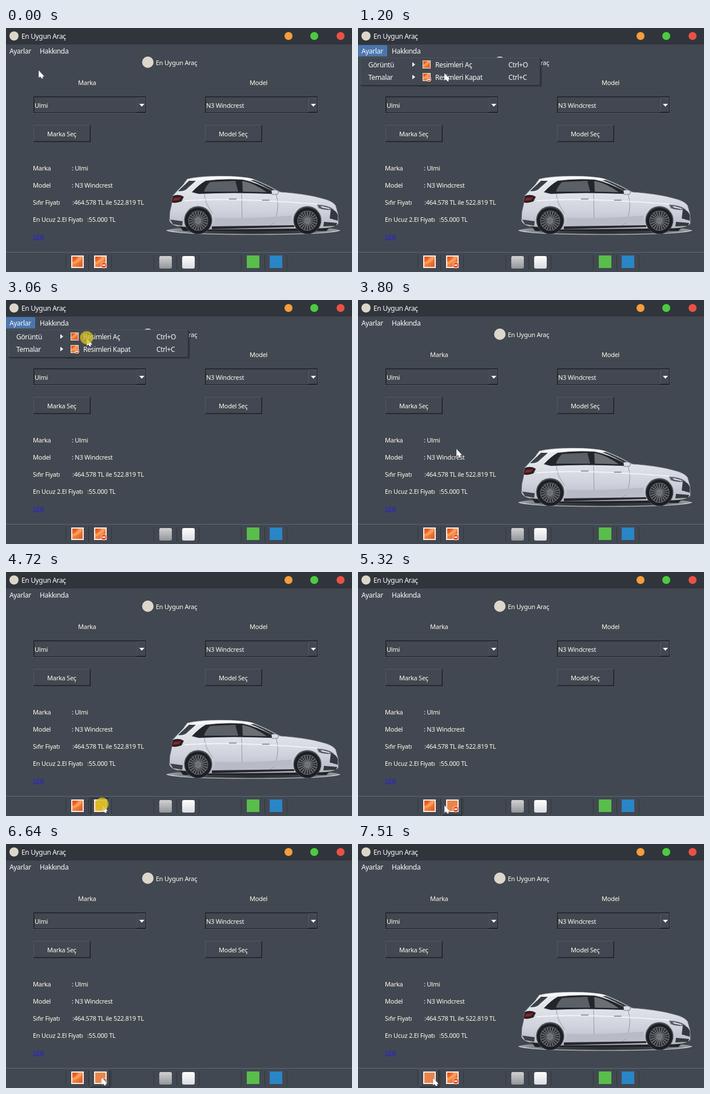
Recreate the animation shown at these times as an HTML page with a canvas. Size 605x428 px, loop 8.64 s.

```html
<!DOCTYPE html>
<html lang="tr">
<head>
<meta charset="utf-8">
<title>En Uygun Araç</title>
<style>
html, body { margin: 0; width: 100%; height: 100%; overflow: hidden; background: #424851; }
canvas { display: block; }
</style>
</head>
<body>
<canvas id="stage" width="605" height="428"></canvas>
<script>
const ctx = document.getElementById('stage').getContext('2d');
const LOOP = 8640, STEP = 66.6;
const BG = '#424851', DARK = '#1c1f24', LIGHT = '#525861', CREAM = '#fffdec', WHITE = '#fafafa';
const BRAND = 'Ulmi', MODEL = 'N3 Windcrest';

// pointer path: time, x, y
const PATH = [
  [67, 57, 74], [270, 25, 40], [470, 25, 40], [790, 26, 61],
  [940, 26, 61], [1200, 152, 79], [1335, 156, 83],
  [1740, 156, 83], [2065, 25, 40], [2330, 25, 40], [2660, 26, 61],
  [2740, 26, 61], [2990, 141, 67],
  [3400, 141, 67], [3660, 178, 190], [3930, 166, 330], [4120, 102, 405], [4255, 120, 411],
  [4330, 120, 411], [4650, 168, 408],
  [5130, 168, 408], [5560, 131, 410],
  [6260, 131, 410], [6500, 167, 409],
  [6910, 167, 409], [7260, 131, 410]
];
const CLICKS = [[270, 400], [1540, 1600], [2130, 2270], [3060, 3130], [4720, 4860], [5650, 5780], [6580, 6640], [7370, 7510]];
const MENU = [[270, 1600], [2130, 3130]];
const HIDDEN = [[1600, 3130], [4860, 5780], [6640, 7510]];

const within = (list, t) => list.find(([a, b]) => t >= a && t < b);
const clamp = v => Math.max(0, Math.min(1, v));

function pointer(t) {
  t = Math.floor((t + 12) / STEP) * STEP;
  let a = PATH[0];
  for (const b of PATH) {
    if (t < b[0]) {
      const f = clamp((t - a[0]) / (b[0] - a[0] || 1));
      return [Math.round(a[1] + (b[1] - a[1]) * f), Math.round(a[2] + (b[2] - a[2]) * f)];
    }
    a = b;
  }
  return [a[1], a[2]];
}

function rect(x, y, w, h, fill) {
  ctx.fillStyle = fill;
  ctx.fillRect(x, y, w, h);
}

function disc(x, y, r, fill) {
  ctx.fillStyle = fill;
  ctx.beginPath();
  ctx.arc(x, y, r, 0, 7);
  ctx.fill();
}

function shape(d, fill, stroke, width = 1) {
  const p = new Path2D(d);
  if (fill) { ctx.fillStyle = fill; ctx.fill(p); }
  if (stroke) { ctx.strokeStyle = stroke; ctx.lineWidth = width; ctx.stroke(p); }
}

function grad(x0, y0, x1, y1, ...colors) {
  const g = ctx.createLinearGradient(x0, y0, x1, y1);
  colors.forEach((c, i) => g.addColorStop(i / (colors.length - 1), c));
  return g;
}

function text(s, x, y, color = CREAM, size = 11) {
  ctx.font = size + 'px "Noto Sans", "Open Sans", sans-serif';
  ctx.letterSpacing = size > 11 ? '-0.35px' : '-0.25px';
  ctx.fillStyle = color;
  ctx.fillText(s, x, y);
}

// raised bevel; swap the colours for a sunken one
function bevel(x, y, w, h, top = LIGHT, bottom = DARK) {
  rect(x, y, w, 1, top);
  rect(x, y, 1, h, top);
  rect(x, y + h - 1, w, 1, bottom);
  rect(x + w - 1, y, 1, h, bottom);
}

function combo(x, label) {
  bevel(x, 120, 198, 30, DARK, LIGHT);
  bevel(x + 1, 121, 196, 28, '#33383f', DARK);
  bevel(x + 181, 122, 16, 26);
  shape(`M${x + 185} 133h9l-4.5 5z`, '#fff');
  text(label, x + 2, 140);
}

function button(x, label) {
  bevel(x, 170, 100, 30);
  bevel(x + 1, 171, 98, 28, BG, '#2f343b');
  text(label, x + 24, 190);
}

function picture(x, y, s, fill) {
  rect(x, y, s, s, '#fbeee4');
  const b = s > 16 ? 2 : 1, n = s - 2 * b;
  rect(x + b, y + b, n, n, fill || grad(x, y, x + s, y + s, '#e03c16', '#f5803a', '#e2481a'));
  if (!fill) shape(`M${x + b} ${y + b + n * 0.5}q${n * 0.4} ${-n * 0.05} ${n * 0.6} ${-n * 0.5}h${n * 0.4}q${-n * 0.1} ${n * 0.5} ${-n} ${n * 0.8}z`, 'rgba(255,178,110,.6)');
}

function minus(x, y, r) {
  disc(x, y, r, '#f3ddd0');
  disc(x, y, r - 1, '#e4521f');
  rect(x - r * 0.5, y - 1, r, 2, '#fff');
}

function tile(x, top, bottom) {
  ctx.fillStyle = grad(0, 400, 0, 421, top, bottom);
  ctx.beginPath();
  ctx.roundRect(x, 400, 22, 22, 3);
  ctx.fill();
}

function wheel(x, y) {
  disc(x, y, 23, '#1d1f23');
  disc(x, y, 17.5, '#6c6f74');
  disc(x, y, 16.5, '#2c2f34');
  ctx.strokeStyle = '#83868b';
  ctx.lineWidth = 1.2;
  ctx.beginPath();
  for (let i = 0; i < 20; i++) {
    const a = i * Math.PI / 10;
    ctx.moveTo(x, y);
    ctx.lineTo(x + 16.5 * Math.cos(a), y + 16.5 * Math.sin(a));
  }
  ctx.stroke();
  disc(x, y, 3.5, '#6c6f74');
}

function car() {
  // ground
  ctx.fillStyle = grad(281, 0, 584, 0, '#a4a7ab', '#3a3d43', '#2b2e33', '#3a3d43', '#a4a7ab');
  ctx.beginPath();
  ctx.ellipse(432, 355, 151, 7, 0, 0, 7);
  ctx.fill();
  shape('M281 355Q300 362 432 362T584 355', null, '#dcdee1', 1.2);
  shape('M300 344H572L560 356H310z', '#1f2226');
  // body
  shape('M286 338L287 322L290 309L291 295Q299 286 309 276L317 265Q336 260 374 260Q414 260 432 265Q455 274 480 288Q524 291 552 299Q570 303 576 311L580 325L581 343Q575 350 552 351L355 353L298 347Q288 344 286 338z',
    grad(0, 260, 0, 353, '#eceef2', '#dfe1e8', '#cfd2db', '#b2b6c1'), '#a6aab4', 0.8);
  shape('M317 266Q342 260 376 260Q414 260 432 265L420 266Q365 262 327 269z', '#f7f8fa');
  shape('M320 268L332 268L314 284Q307 287 301 286z', '#3b3f46');
  // glasshouse
  shape('M325 288Q337 275 349 268Q380 264 414 266Q440 271 468 288L466 291Q396 288 337 291z', '#22262b');
  shape('M346 287Q350 276 357 270L401 268L406 287z', '#5b6067');
  shape('M413 268Q434 272 456 288L414 287z', '#6a6f76');
  shape('M434 267Q455 275 478 288L469 289Q449 275 427 267z', '#3a3f47');
  shape('M464 285Q472 282 477 287L475 292L465 292z', '#d9dce2', '#555a63', 0.7);
  // lamps
  shape('M291 295Q301 290 311 296L307 304Q297 308 290 306z', '#2d1e21');
  shape('M293 298L307 297L302 302L292 303z', '#7c2a2a');
  shape('M544 310Q557 310 568 315L574 319Q557 320 547 316z', '#5a616c');
  shape('M550 312L565 316L568 318L553 315z', '#f1f4f7');
  // doors, creases, grille
  shape('M412 291L413 344M347 291Q348 309 362 326M472 291Q480 313 469 342L462 346', null, '#8d929c', 0.9);
  shape('M312 303Q400 297 544 309', null, '#f7f8fa', 1.6);
  shape('M365 333Q425 335 500 329L498 341L365 347z', '#b7bbc6');
  shape('M360 348L504 346V349L360 353z', '#25282d');
  shape('M390 300h13M448 302h13', null, '#8e939e', 1.8);
  shape('M568 318Q577 319 580 328L580 338L566 334z', '#34383f');
  shape('M556 340L579 342L577 347L555 348z', '#34383f');
  shape('M287 336L309 339L308 347L292 344z', '#3e4249');
  for (const x of [336, 527]) {
    disc(x, 337, 24.5, '#4a4e56');
    wheel(x, 338);
  }
}

function toolbar(hover, pressed) {
  rect(0, 393, 605, 1, '#626871');
  for (const x of [104, 144, 184, 258, 298, 337, 411, 452, 491]) {
    rect(x, 398, 1, 26, '#31363d');
  }
  if (hover) {
    const x = hover === 1 ? 108 : 148;
    if (pressed) bevel(x, 396, 34, 31, DARK, LIGHT);
    else bevel(x, 396, 34, 31);
  }
  picture(114, 399, 22, hover === 1 && (pressed ? '#f6b32c' : '#e9854b'));
  picture(154, 399, 22, hover === 2 && (pressed ? '#f6b32c' : '#e9854b'));
  if (!(hover === 2 && pressed)) minus(171, 416, 5.5);
  tile(268, '#d2d2d4', '#97989b');
  tile(308, '#ffffff', '#dcdde0');
  rect(421, 399, 22, 22, '#58bd4b');
  rect(461, 399, 22, 22, '#2a86c7');
}

function panel(x, w) {
  rect(x + 3, 55, w, 48, 'rgba(20,23,28,.3)');
  rect(x, 52, w, 49, BG);
  bevel(x, 52, w, 49, '#4c525b', '#262a30');
}

function menu(age) {
  const k = Math.floor(age / STEP + 0.1) + 1;
  ctx.globalAlpha = clamp(k * 0.2);
  panel(4, 112);
  text('Görüntü', 18, 69, WHITE, 12);
  text('Temalar', 18, 91, WHITE, 12);
  for (const y of [60, 82]) shape(`M95 ${y}v8l5 -4z`, WHITE);
  ctx.globalAlpha = clamp((k - 5) * 0.25);
  if (k > 5) {
    panel(104, 215);
    rect(104, 53, 1, 47, BG);
    picture(113, 57, 14);
    picture(113, 79, 14);
    minus(124, 90, 4);
    text('Resimleri Aç', 135, 69, WHITE, 12);
    text('Resimleri Kapat', 135, 91, WHITE, 12);
    text('Ctrl+O', 263, 69, WHITE, 12);
    text('Ctrl+C', 263, 91, WHITE, 12);
  }
  ctx.globalAlpha = 1;
}

function draw(t) {
  const [x, y] = pointer(t);
  const click = within(CLICKS, t), open = within(MENU, t);
  const hover = y < 395 ? 0 : x >= 108 && x < 142 ? 1 : x >= 148 && x < 182 ? 2 : 0;

  rect(0, 0, 605, 428, BG);
  rect(0, 0, 605, 29, '#30353c');
  disc(14, 14, 8, '#ded6cb');
  text('En Uygun Araç', 27, 19, WHITE, 12);
  disc(494, 14, 7, '#f79c3c');
  disc(539, 14, 7, '#4bcb40');
  disc(585, 14, 7, '#ea5049');

  if (open || (x < 51 && y >= 30 && y < 50)) rect(0, 30, 51, 20, '#4a75ae');
  text('Ayarlar', 6, 45, WHITE, 12);
  text('Hakkında', 59, 45, WHITE, 12);

  disc(248, 60, 10, '#ded6cb');
  text('En Uygun Araç', 262, 65);
  text('Marka', 126, 100);
  text('Model', 426, 100);
  combo(48, BRAND);
  combo(348, MODEL);
  button(48, 'Marka Seç');
  button(348, 'Model Seç');

  text('Marka', 47, 250);
  text(': ' + BRAND, 115, 250);
  text('Model', 47, 280);
  text(': ' + MODEL, 115, 280);
  text('Sıfır Fiyatı', 47, 310);
  text(':464.578 TL ile 522.819 TL', 116, 310);
  text('En Ucuz 2.El Fiyatı', 47, 340);
  text(':55.000 TL', 142, 340);
  text('Link', 47, 370, '#1f1fe0');
  rect(47, 371, 19, 1, '#1f1fe0');

  if (!within(HIDDEN, t)) car();
  toolbar(hover, click);
  if (open) menu(t - open[0]);

  shape(`M${x} ${y}v13.5l3 -2.2l2 3.2h3l-1.2 -3.3h3.6z`, '#fff', 'rgba(20,22,26,.35)', 0.7);
  if (click) disc(x, y - 1, 11.5, 'rgba(210,190,34,.78)');
}

function frame(now) {
  draw(now % LOOP);
  requestAnimationFrame(frame);
}
draw(0);
requestAnimationFrame(frame);
</script>
</body>
</html>
```
